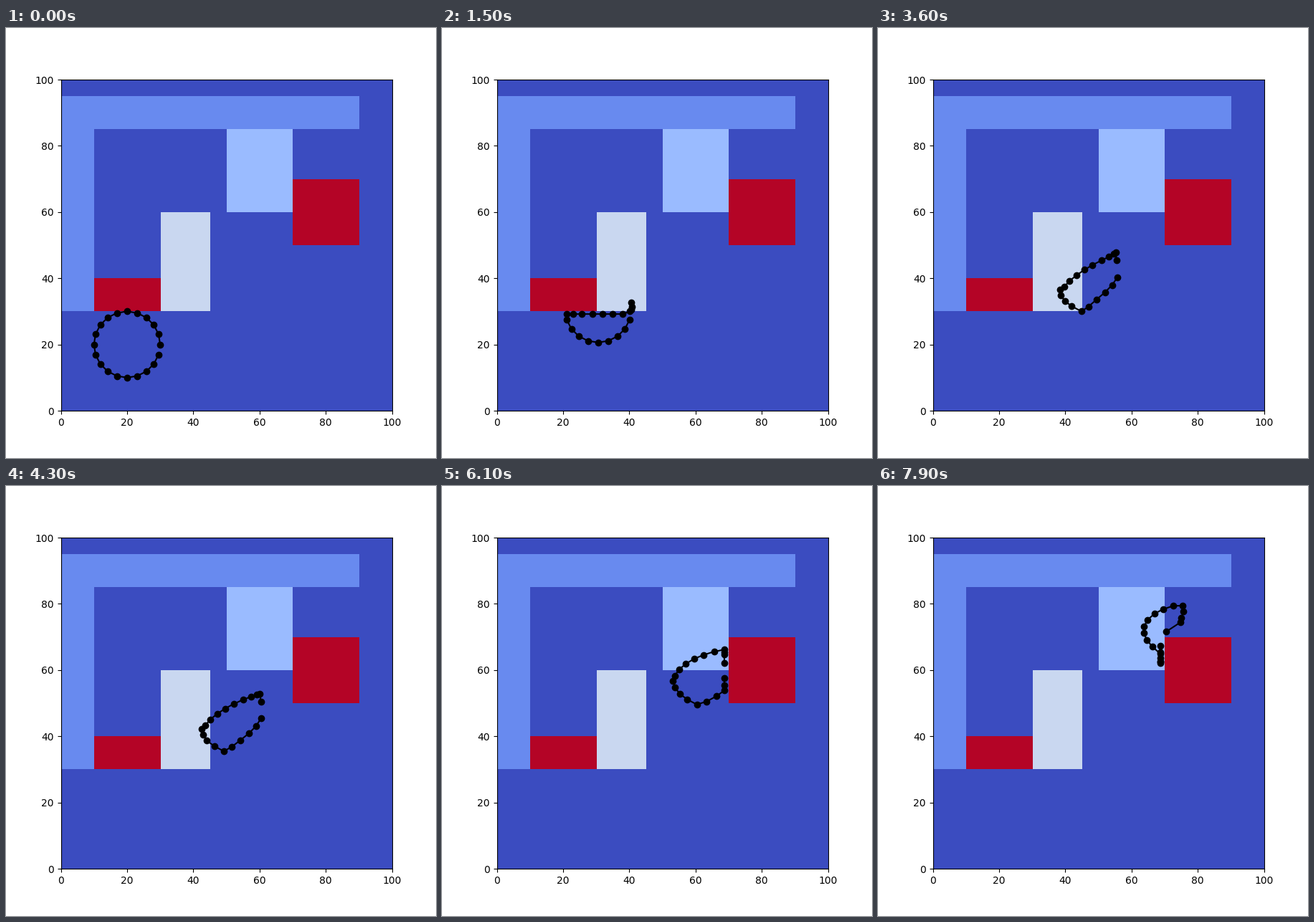
These frames come from a looping animation (600x600 px, 8 s). A matplotlib script:

```python
import numpy as np
import matplotlib.pyplot as plt
from matplotlib.animation import FuncAnimation
from matplotlib.colors import to_rgb

FRAMES, INTERVAL = 80, 100
N, RADIUS = 20, 10
START, GOAL = 20, 80        # ring centres, on the diagonal

# x0, x1, y0, y1, colour of each terrain patch
PATCHES = [
    (0, 10, 30, 95, "#688aef"),
    (0, 90, 85, 95, "#688aef"),
    (10, 30, 30, 40, "#b40426"),
    (30, 45, 30, 60, "#c9d7f0"),
    (50, 70, 60, 85, "#9abbff"),
    (70, 90, 50, 70, "#b40426"),
]

CEILING = 29.2              # underside of the red and grey patches
SIDE, SIDE_TOP = 68.7, 71.2  # left face of the far red patch
CLIMB = 0.55                # climbing speed along that face


def terrain():
    img = np.empty((100, 100, 3))
    img[:] = to_rgb("#3b4cc0")
    for x0, x1, y0, y1, color in PATCHES:
        img[y0:y1, x0:x1] = to_rgb(color)
    return img


def simulate():
    """Each node walks one unit per frame to its own goal, sliding on walls."""
    index = np.arange(N)
    angle = 2 * np.pi * index / N
    ring = RADIUS * np.column_stack([np.cos(angle), np.sin(angle)])
    release = 8 + 1.9 * index   # the grey patch lets nodes in one by one

    pos = START + ring
    path = [pos]
    for t in range(FRAMES - 1):
        way = GOAL + ring - pos
        new = pos + way / np.linalg.norm(way, axis=1, keepdims=True)
        x, y = pos.T

        red = (x > 10) & (x < 30)
        grey = (x >= 30) & (x < 45) & (t < release)
        under = (red | grey) & (y < 30.5) & (new[:, 1] > CEILING)
        new[under, 0] = x[under] + 1
        new[under, 1] = CEILING

        beside = (x <= SIDE) & (new[:, 0] > SIDE) & (new[:, 1] < SIDE_TOP)
        new[beside, 0] = SIDE
        new[beside, 1] = y[beside] + CLIMB

        pos = new
        path.append(pos)
    return path


path = simulate()

fig, ax = plt.subplots(figsize=(6, 6), dpi=100)
ax.imshow(terrain(), origin="lower", extent=(0, 100, 0, 100),
          interpolation="nearest")
ax.set_xlim(0, 100)
ax.set_ylim(0, 100)
ax.set_xticks(range(0, 101, 20))
ax.set_yticks(range(0, 101, 20))
cell, = ax.plot([], [], "ko-")


def update(frame):
    cell.set_data(*path[frame].T)
    return cell,


anim = FuncAnimation(fig, update, frames=FRAMES, interval=INTERVAL,
                     repeat=True, repeat_delay=0)
plt.show()
```
